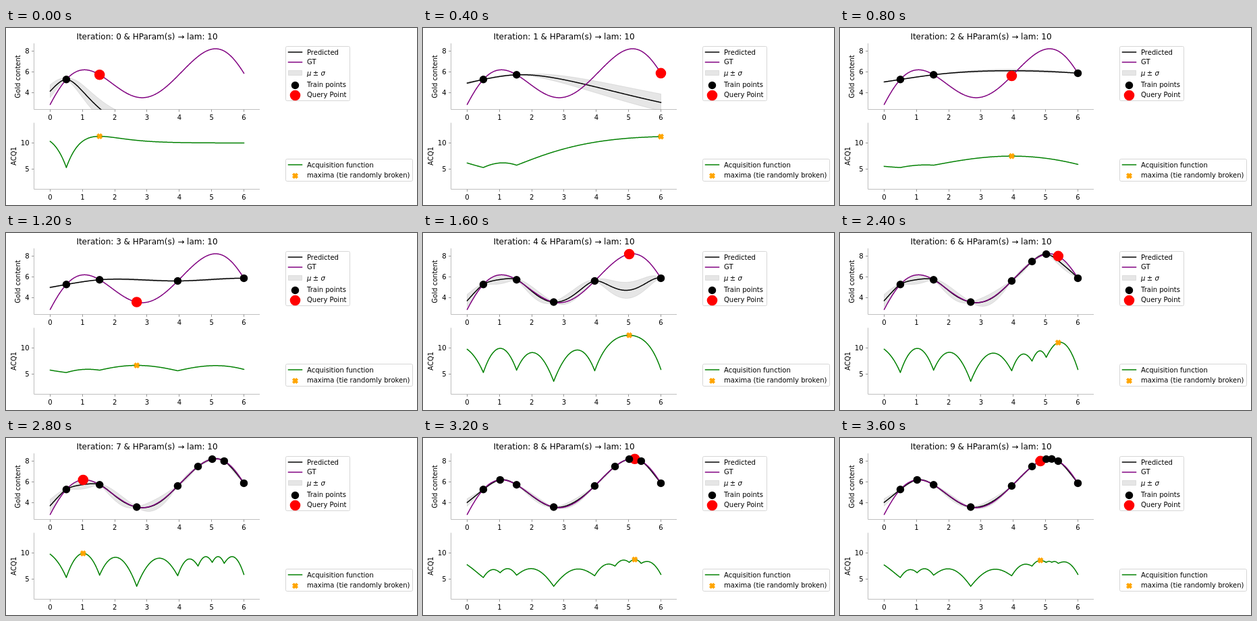
An HTML page that plays this animation: 609 by 264 pixels, repeating every 4000 ms.

```html
<!DOCTYPE html>
<html lang="en">
<head>
<meta charset="utf-8">
<title>Bayesian optimisation</title>
<style>
  html, body { margin: 0; width: 100%; height: 100%; overflow: hidden; background: #fff; }
  svg { display: block; font: 10px "DejaVu Sans", Verdana, sans-serif; }
  .line { fill: none; stroke-width: 1.5; stroke-linejoin: round; stroke-linecap: square; }
  .band { fill: #808080; stroke: #808080; fill-opacity: .2; stroke-opacity: .2; }
  .spine { fill: none; stroke: #bfbfbf; }
  .tick { stroke: #999; }
  .box { fill: #fff; stroke: #d6d6d6; }
  .mark { fill: orange; stroke: orange; stroke-width: 1.5; stroke-linejoin: miter; }
  .mid { text-anchor: middle; }
  .end { text-anchor: end; }
  .math { font-style: oblique; }
</style>
</head>
<body>
<svg width="609" height="264" viewBox="0 0 609 264">
  <defs>
    <clipPath id="clip"><rect x="41" y="22.9" width="335" height="98.8"/></clipPath>
    <path id="cross" class="mark" d="M-1.75-3.5L0-1.75 1.75-3.5 3.5-1.75 1.75 0 3.5 1.75 1.75 3.5 0 1.75-1.75 3.5-3.5 1.75-1.75 0-3.5-1.75z"/>
  </defs>
  <g id="axes"></g>
  <g clip-path="url(#clip)">
    <path id="band" class="band"/>
    <path id="mean" class="line" stroke="black"/>
    <path id="truth" class="line" stroke="purple"/>
    <circle id="query" r="7.8" fill="red"/>
    <g id="train"></g>
  </g>
  <path id="acq" class="line" stroke="green"/>
  <use id="best" href="#cross"/>
  <text id="title" class="mid" x="209" y="17" font-size="12"></text>
  <text class="mid" transform="translate(21 72.5) rotate(-90)">Gold content</text>
  <text class="mid" transform="translate(15 191) rotate(-90)">ACQ1</text>

  <rect class="box" x="414.5" y="27.5" width="95" height="81" rx="2"/>
  <path class="line" stroke="black" d="M418.5 36h20"/>
  <path class="line" stroke="purple" d="M418.5 51h20"/>
  <rect class="band" x="418.5" y="63.5" width="20" height="7"/>
  <circle cx="428.5" cy="85.5" r="5.75"/>
  <circle cx="428.5" cy="100.5" r="7.8" fill="red"/>
  <text x="446" y="40">Predicted</text>
  <text x="446" y="54">GT</text>
  <text y="71"><tspan class="math" x="446">μ</tspan><tspan x="454.8">±</tspan><tspan class="math" x="466.5">σ</tspan></text>
  <text x="446" y="88">Train points</text>
  <text x="446" y="103">Query Point</text>

  <rect class="box" x="414.5" y="195.5" width="188" height="33" rx="2"/>
  <path class="line" stroke="green" d="M418.5 204h20"/>
  <use href="#cross" x="428.5" y="220.5"/>
  <text x="446" y="208">Acquisition function</text>
  <text x="446" y="223">maxima (tie randomly broken)</text>
</svg>
<script>
const STEP = 400, LAM = 10;
const SAMPLES = [0.5, 1.53, 6, 3.95, 2.68, 5.02, 4.58, 5.39, 1.02, 5.19, 4.84];
// Fixed kernel length per iteration; 0 means fit by maximum likelihood.
const LENGTHS = [1, 0, 0, 0, 1, 1, 1, 1, 0, 0];
const GRID = Array.from({ length: 601 }, (_, i) => i / 100);

const $ = id => document.getElementById(id);
const px = x => 65.5 + 47.83 * x;
const topY = v => 65.1 - 15.45 * (v - 6);
const lowY = v => 171.5 - 7.7 * (v - 10);
const dot = (a, b) => a.reduce((s, v, i) => s + v * b[i], 0);

function cholesky(A) {
  const L = A.map(row => row.map(() => 0));
  for (let i = 0; i < A.length; i++)
    for (let j = 0; j <= i; j++) {
      let s = A[i][j];
      for (let k = 0; k < j; k++) s -= L[i][k] * L[j][k];
      L[i][j] = i === j ? Math.sqrt(s) : s / L[j][j];
    }
  return L;
}

function forward(L, b) {
  const x = [];
  for (let i = 0; i < b.length; i++) {
    let s = b[i];
    for (let k = 0; k < i; k++) s -= L[i][k] * x[k];
    x[i] = s / L[i][i];
  }
  return x;
}

function backward(L, b) {
  const x = b.slice();
  for (let i = b.length - 1; i >= 0; i--) {
    for (let k = i + 1; k < b.length; k++) x[i] -= L[k][i] * x[k];
    x[i] /= L[i][i];
  }
  return x;
}

const matern = len => r => {
  const s = Math.sqrt(3) * Math.abs(r) / len;
  return (1 + s) * Math.exp(-s);
};
const gauss = len => r => Math.exp(-r * r / (2 * len * len));

function fitGP(kernel, xs, ys, noise) {
  const L = cholesky(xs.map((a, i) => xs.map((b, j) => kernel(a - b) + (i === j ? noise : 0))));
  const z = forward(L, ys), weights = backward(L, z);
  return {
    loss: dot(z, z) / 2 + L.reduce((s, row, i) => s + Math.log(row[i]), 0),
    mean: x => dot(xs.map(a => kernel(x - a)), weights),
    sigma: x => {
      const v = forward(L, xs.map(a => kernel(x - a)));
      return Math.sqrt(Math.max(0, 1 - dot(v, v)));
    }
  };
}

function bestLength(xs, ys) {
  let lo = Math.log(1.2), hi = Math.log(12);
  const loss = u => fitGP(matern(Math.exp(u)), xs, ys, 1e-10).loss;
  for (let i = 0; i < 40; i++) {
    const a = lo + (hi - lo) / 3, b = hi - (hi - lo) / 3;
    if (loss(a) < loss(b)) hi = b; else lo = a;
  }
  return Math.exp((lo + hi) / 2);
}

// Smooth ground truth through a few knots.
const knots = [[0, 2.83], [0.5, 5.25], [1.05, 6.17], [1.53, 5.7], [2.68, 3.55], [2.87, 3.48],
  [3.95, 5.59], [4.58, 7.46], [5.02, 8.17], [5.19, 8.21], [5.39, 7.98], [6, 5.85]];
const smooth = fitGP(gauss(1.3), knots.map(k => k[0]), knots.map(k => k[1] - 5.5), 3e-5);
const truth = x => 5.5 + smooth.mean(x);

const points = (xs, vs, y) => xs.map((x, i) => px(x).toFixed(2) + " " + y(vs[i]).toFixed(2));
const curve = (vs, y) => "M" + points(GRID, vs, y).join("L");

function iteration(n) {
  const xs = SAMPLES.slice(0, n + 1), ys = xs.map(truth);
  const gp = fitGP(matern(LENGTHS[n] || bestLength(xs, ys)), xs, ys, 1e-10);
  const mean = GRID.map(gp.mean), sigma = GRID.map(gp.sigma);
  const upper = points(GRID, mean.map((m, i) => m + sigma[i]), topY);
  const lower = points(GRID, mean.map((m, i) => m - sigma[i]), topY);
  const next = SAMPLES[n + 1];
  return {
    mean: curve(mean, topY),
    band: "M" + upper.concat(lower.reverse()).join("L") + "z",
    acq: curve(mean.map((m, i) => m + LAM * sigma[i]), lowY),
    x: px(next),
    queryY: topY(truth(next)),
    bestY: lowY(gp.mean(next) + LAM * gp.sigma(next)),
    train: xs.map((x, i) => `<circle cx="${px(x)}" cy="${topY(ys[i])}" r="5.75"/>`).join("")
  };
}

function drawAxes(top, bottom, y, ticks) {
  const base = Math.floor(bottom) + 0.5;
  let out = `<path class="spine" d="M41.5 ${top}V${base}H376"/>`;
  for (let i = 0; i <= 6; i++) {
    const x = Math.floor(px(i)) + 0.5;
    out += `<path class="tick" d="M${x} ${base}v3.5"/><text class="mid" x="${px(i)}" y="${Math.round(bottom + 15.5)}">${i}</text>`;
  }
  for (const v of ticks) {
    const at = Math.floor(y(v)) + 0.5;
    out += `<path class="tick" d="M41.5 ${at}h-3.5"/><text class="end" x="34.5" y="${Math.round(y(v) + 3.7)}">${v}</text>`;
  }
  $("axes").innerHTML += out;
}

drawAxes(22.9, 121.7, topY, [4, 6, 8]);
drawAxes(141.4, 240.3, lowY, [5, 10]);
$("truth").setAttribute("d", curve(GRID.map(truth), topY));

const steps = LENGTHS.map((_, n) => iteration(n));

function show(n) {
  const s = steps[n];
  for (const id of ["mean", "band", "acq"]) $(id).setAttribute("d", s[id]);
  $("query").setAttribute("cx", s.x);
  $("query").setAttribute("cy", s.queryY);
  $("best").setAttribute("x", s.x);
  $("best").setAttribute("y", s.bestY);
  $("train").innerHTML = s.train;
  $("title").textContent = `Iteration: ${n} & HParam(s) → lam: ${LAM}`;
}

const start = performance.now();
let shown = -1;
function tick() {
  const n = Math.floor((performance.now() - start) / STEP) % steps.length;
  if (n !== shown) show(shown = n);
  requestAnimationFrame(tick);
}
tick();
</script>
</body>
</html>
```
